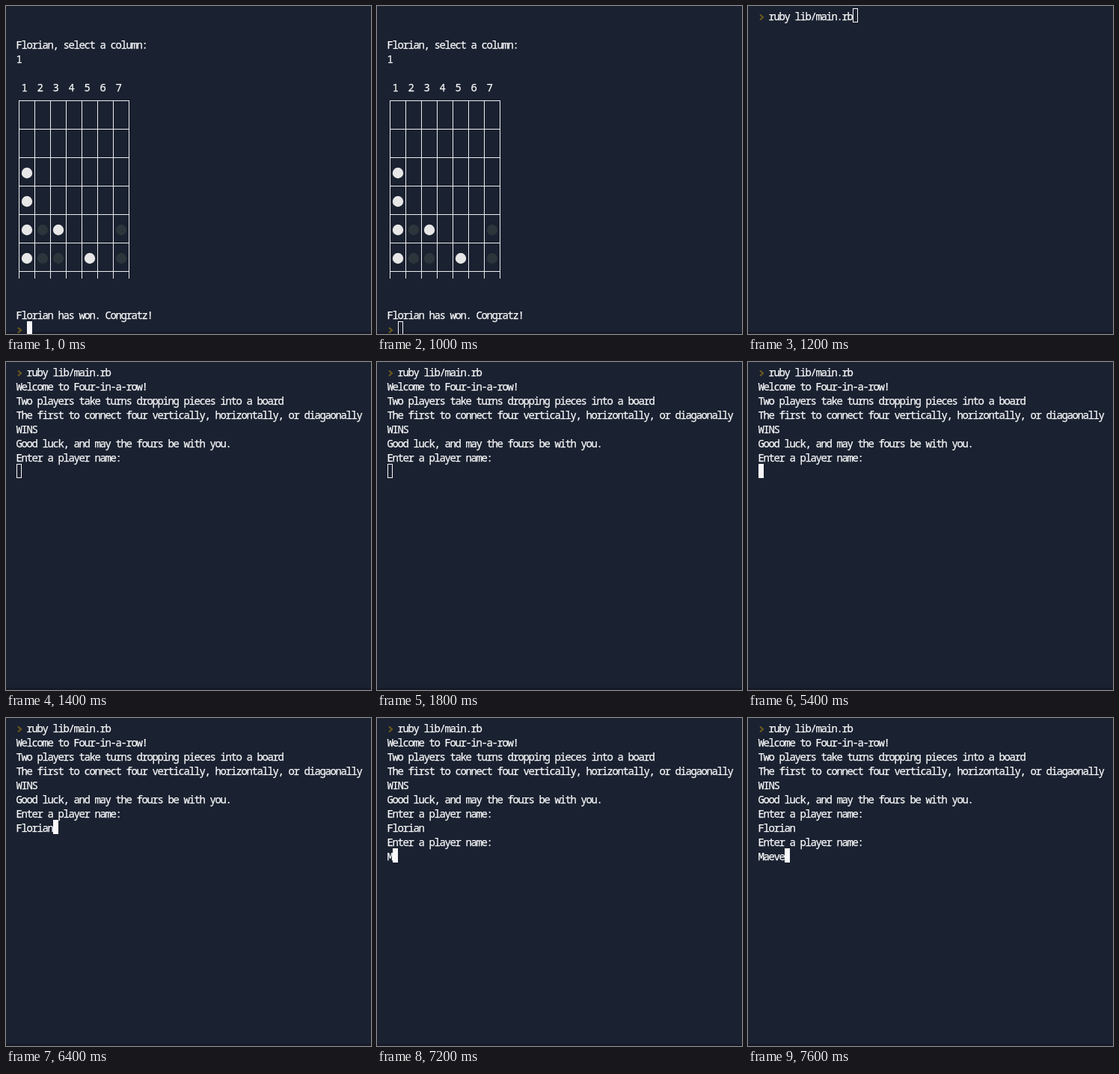
Animation, 488 px wide and 438 px high, one loop 8 s. Source, as an HTML page:

```html
<!DOCTYPE html>
<html lang="en">
<head>
<meta charset="utf-8">
<title>Four in a row</title>
<style>
html, body { margin: 0; width: 100%; height: 100%; overflow: hidden; background: #1a2130; }
svg, pre { position: absolute; left: 0; top: 0; }
pre {
  margin: 0; left: 13.5px; top: 4px; color: #f8f9fa;
  font: 500 14px/19px "Noto Sans Mono", "DejaVu Sans Mono", monospace;
  letter-spacing: -1.4px; font-variant-ligatures: none;
  -webkit-text-stroke: .25px #f8f9fa;
}
#cursor {
  position: absolute; width: 7px; height: 19px; box-sizing: border-box;
  border: 1px solid #f8f8fa;
}
</style>
</head>
<body>
<svg width="488" height="438">
  <rect y="435" width="488" height="3" fill="#161a27"/>
  <g id="board"></g>
  <path id="prompt" d="M16 11.5l4 3.5-4 3.5" fill="none" stroke="#6b591f" stroke-width="2.2"/>
</svg>
<pre id="text"></pre>
<div id="cursor"></div>
<script>
const $ = id => document.getElementById(id);
const board = $('board'), prompt = $('prompt'), text = $('text'), cursor = $('cursor');
const LOOP = 8000, COL = 7, ROW = 19;
const ONE = 'Florian', TWO = 'Maeve';

const command = '  ruby lib/main.rb';
const ask = 'Enter a player name:';
const intro = [
  command,
  'Welcome to Four-in-a-row!',
  'Two players take turns dropping pieces into a board',
  'The first to connect four vertically, horizontally, or diagaonally',
  'WINS',
  'Good luck, and may the fours be with you.',
  ask
];
const ending = [
  '', '', ONE + ', select a column:', '1', '', ' 1  2  3  4  5  6  7',
  ...Array(15).fill(''), ONE + ' has won. Congratz!', '  '
];

// Grid lines, then pieces as [column, row] pairs
function drawBoard() {
  let lines = '';
  for (let i = 0; i < 8; i++) lines += `M${17.5 + 21 * i} 126V364`;
  for (let i = 0; i < 7; i++) lines += `M17 ${126.5 + 38 * i}H165`;
  const pieces = (list, fill) => list.map(([c, r]) =>
    `<circle cx="${28 + 21 * c}" cy="${147 + 38 * r}" r="7.2" fill="${fill}"/>`).join('');
  board.innerHTML = `<path d="${lines}" stroke="#eceef0"/>` +
    pieces([[0, 2], [0, 3], [0, 4], [0, 5], [2, 4], [4, 5]], '#e7e7e7') +
    pieces([[1, 4], [1, 5], [2, 5], [6, 4], [6, 5]], '#2b353b');
}

// One letter at the start, then two more every 200 ms
function typed(word, t, start) {
  return t < start ? '' : word.slice(0, 1 + 2 * Math.floor((t - start) / 200));
}

function screen(t) {
  if (t < 1200) return ending;
  if (t < 1400) return [command];
  const lines = [...intro, typed(ONE, t, 5800)];
  if (t >= 6600) lines.push(ask, typed(TWO, t, 7200));
  return lines;
}

function draw(t) {
  const lines = screen(t), last = lines.length - 1;
  const finished = lines === ending;
  const focused = t < 1000 || t >= 4800;
  text.textContent = lines.join('\n');
  board.style.display = finished ? '' : 'none';
  prompt.setAttribute('transform', `translate(0 ${finished ? last * ROW : 0})`);
  cursor.style.left = 14 + COL * lines[last].length + 'px';
  cursor.style.top = 3 + ROW * last + 'px';
  cursor.style.background = focused ? '#f8f8fa' : 'none';
}

drawBoard();
const begin = performance.now();
function tick() {
  draw((performance.now() - begin) % LOOP);
  requestAnimationFrame(tick);
}
tick();
</script>
</body>
</html>
```
